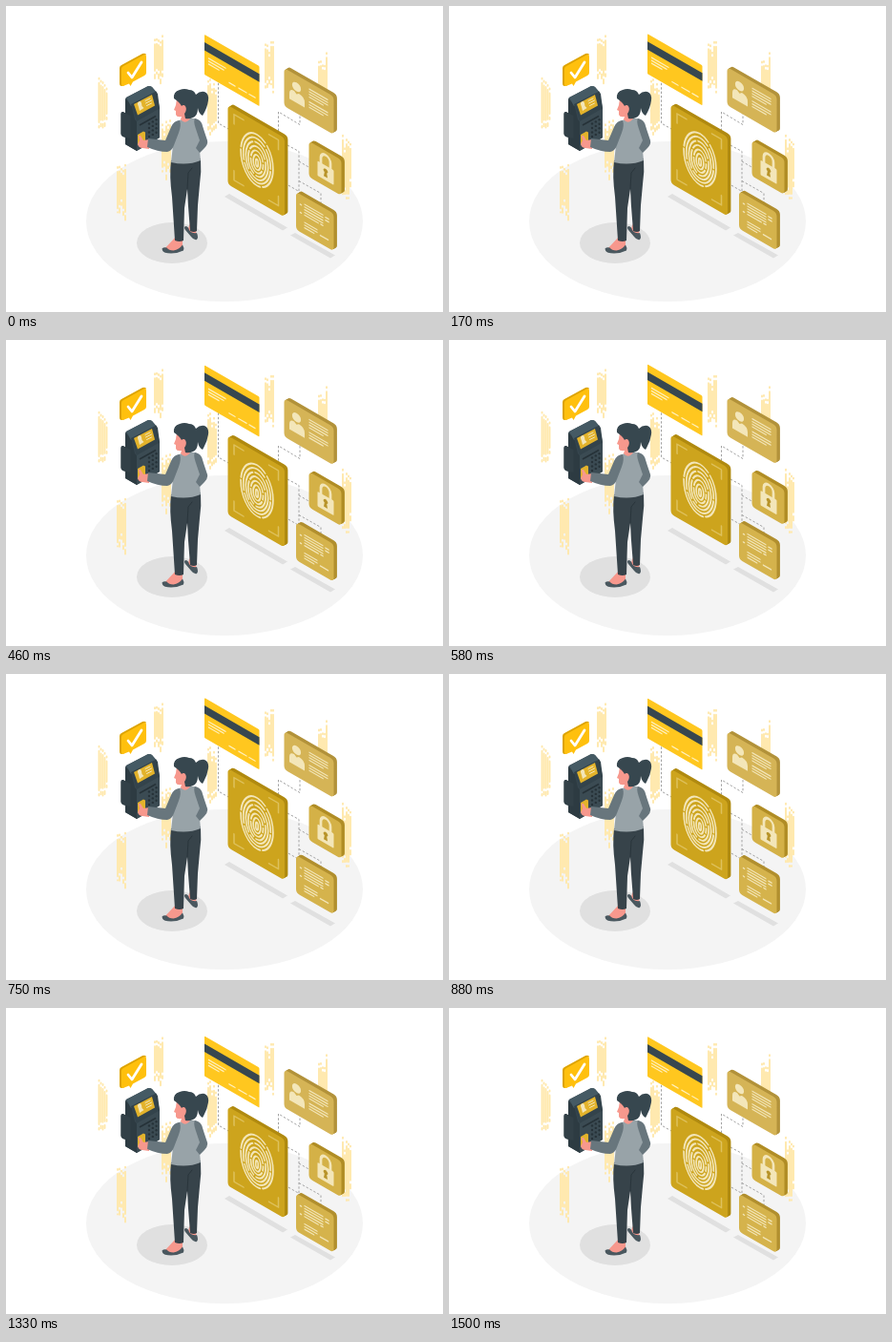
An HTML page that plays this animation: 458 by 321 pixels, repeating every 1540 ms.

```html
<!DOCTYPE html>
<html lang="en">
<head>
<meta charset="utf-8">
<title>Biometric access</title>
<style>
html, body { margin: 0; height: 100%; overflow: hidden; background: #fff; }
svg { display: block; width: 100vw; height: 100vh; }
.line { fill: none; stroke-linecap: round; stroke-linejoin: round; }
.ink { stroke: #f3e6b9; }
.fill { fill: #f3e6b9; }
</style>
</head>
<body>
<svg viewBox="0 0 458 321">
  <ellipse cx="229" cy="226" rx="145" ry="84" fill="#f4f4f4"/>
  <g id="streams" class="line" stroke="#ffe8ac" stroke-width="1.9"/>
  <g fill="#e0e0e0">
    <ellipse cx="174" cy="248.5" rx="37" ry="21.5"/>
    <path d="M229 200l5-3 61 35.5-5 3zM298 240.5l5-2.5 42 23.5-5 3z"/>
  </g>
  <path fill="none" stroke="#a2a2a2" stroke-dasharray="2.4 2"
    d="M222.5 72V123L234 129.5M285.5 131V111L308 124.5V108M295 146l12 6.5V194.5L295 187.5M307 163l12 7M307 183.5l23 13V208"/>

  <g id="bubble">
    <path fill="#dda300" d="M119 65q0-2 2-3l22-12q3-1 4 1l-22 14-1 18-3 1q-2 0-2-3z"/>
    <path fill="#ffc00d" d="M121 66q0-2 2-3l21-11.5q3-1.5 3 1.5V70q0 2-2 3l-12 6.5-2.5 4.5-1.5-2.5-5 2q-3 1.500-3-1.500z"/>
    <path class="line" stroke="#fff" stroke-width="2.8" stroke-linecap="butt" d="M128 70l4 5L142 59"/>
  </g>

  <g id="terminal">
    <path fill="#37474f" d="M120.5 113q0-2 2-2l11 5.5V141l-11-4q-2-1-2-3z"/>
    <path fill="#37474f" d="M125 98q0-1 1-2L149 84q2-.5 4 1l6 7 2 15.500V138l-24 14-12-7z"/>
    <path fill="#2d3b42" d="M125 98l6 4 4 17 2 2.500V152l-12-7z"/>
    <path fill="#324047" d="M120.5 113q0-2 2-2l8 4V139l-8-2q-2-1-2-3z"/>
    <path fill="#455a64" d="M126 96L149 84q2-.5 4 1l5 6-27 14z"/>
    <path fill="#33434b" d="M131 103l26.500-13.500 3.500 18-24 13.500z"/>
    <path fill="#e3b32b" d="M134 103l19-10 3 11.500-18 10z"/>
    <path class="fill" d="M138 103a2 2.300 0 1 1 4-1l.5 3 2 2-4.500 3-1-4z"/>
    <path class="line ink" d="M146 99.5l5-2.500M146.500 102l6-3M147.500 104.500l5-2.500"/>
    <path fill="#3b4b53" d="M137 121l24-13.500V138l-24 14z"/>
    <path stroke="#263238" stroke-width="1.5" d="M140 125l17-9.500"/>
    <g id="keys" fill="#263238"/>
    <path fill="#e3b32b" d="M138 135l6-3.500 2 1V142l-8 4z"/>
  </g>

  <g id="woman">
    <path fill="#f7988d" d="M193 228l7 2-1 10-5 1-4-5zM178 242l7 2v11l-10 3-10-2z"/>
    <path fill="#4a585f" d="M188 231q3 0 4 4 3 4 8 3 2 5 0 7-3 1-6-3l-6-7q-2-3 0-4zM163.500 254.500q2-2 5-1 2 3 7 3 6-1 9.500-6 2 3 1 6-6 3-13 3-8 0-9-3z"/>
    <path fill="#37434a" d="M173 162l31-2q1 14-1 27l-2 22-1 27q-3 2-7 0l-2-26-1-18-3 20-1 34q-4 2-9 0l-3-46q-3-22-1-38z"/>
    <path class="line" stroke="#263238" stroke-width=".8" d="M190 192l1-17 4-5"/>
    <path fill="#f7988d" d="M150 140l-6 1-3-5q-2-1-2 1l1 4-2 4q1 4 5 4l7 1z"/>
    <path fill="#98a3a8" d="M181 120q8-3 17-2 7 1 8 8l2 15-5 11 1 10q-14 6-31 2l2-18 2-19q1-5 4-7z"/>
    <path fill="#68767d" d="M182 120q-6 0-9 7l-6 14-18-2-1 9q11 5 21 5 5-1 7-7l5-13q3-8 1-13z"/>
    <path fill="#68767d" d="M198 118q6 1 8 8l5 15q1 4-3 8l-5 5-4-5 4-8-4-12q-3-8-1-11z"/>
    <path fill="#f7988d" d="M179 97l13 2 1 19q-5 7-10 1l1-3q-5 1-6-2V110l-2-1 2-5z"/>
    <path fill="#37474f" d="M176 97q-1-7 6-9 5-2 10 0 5 0 7 5 4-4 9-3 5 2 4 9-1 8-6 16-4-2-5-8 0 8-5 10-4 2-8 1l-1-5q3-4 1-8-2-2-4 0-2-4-8-8z"/>
    <ellipse cx="186" cy="107.5" rx="2.200" ry="3" fill="#f7988d"/>
  </g>

  <g id="float">
    <g transform="translate(208 30) skewY(30)">
      <rect width="57.5" height="42" rx="1" fill="#ffc71f"/>
      <path fill="#37474f" d="M0 8H57.5v8.500H0z"/>
      <path class="line" stroke="#fff0bd" stroke-width="1.4" d="M4.500 22.500H22M4.500 25.500H20M4.500 28.500H15M26 35.500h6M36 35.500h8M47 35.500h6"/>
    </g>
    <g data-panel="232.5 104 59.5 83" data-face="#cda41d" data-edge="#b08a10">
      <path class="line" stroke="#e5cb72" stroke-opacity=".75" stroke-width="1.500" d="M6.500 16V6H16.500M43 6H53V16M53 65V75H43M16.500 75H6.500V65"/>
      <g id="print" class="line ink" stroke-width="1.7"/>
    </g>
    <g data-panel="291.5 65 52 40" data-face="#d5b456" data-edge="#b2923a">
      <circle class="fill" cx="13" cy="12.500" r="4.600"/>
      <path class="fill" d="M5.500 29V24q0-6 5-6l2.500 2 2.500-2q6 0 6 6v5z"/>
      <path class="line ink" data-rows="26.500 7 19 4"/>
      <path class="line ink" data-rows="26.500 20.500 19 3"/>
    </g>
    <g data-panel="317.500 141.800 34 37.500" data-face="#d4b147" data-edge="#b08d25">
      <path class="line ink" stroke-width="2.700" d="M12.500 16.500V10a5 5.500 0 0 1 10 0V16.500"/>
      <rect class="fill" x="9" y="15.500" width="17" height="15.500" rx="1"/>
      <path fill="#b8942a" d="M16.300 23a2.200 2.200 0 1 1 2.400 0l.8 4.500h-4z"/>
    </g>
    <g data-panel="304 195 39.500 39.500" data-face="#d5b34c" data-edge="#b18f2e">
      <path class="line ink" data-rows="9 8 19 5"/>
      <path class="line ink" data-rows="9 27 13 3"/>
      <path class="line ink" stroke-width="1.500" d="M4.500 10.500h1M4.500 19h1M31 9h3M31 12h3M26 19h2M25.500 31h8"/>
    </g>
  </g>
</svg>
<script>
const PERIOD = 1540, LIFT = 5;
const $ = id => document.getElementById(id);
const repeat = (n, make) => Array.from({ length: n }, (_, i) => make(i)).join("");

let seed = 7;
const random = () => (seed = seed * 16807 % 2147483647) / 2147483647;

// Falling data: long strips with a loose dot at either end
function stream(x, y, h) {
  return repeat(5, i => {
    const top = y + h * (.05 + random() * .25), bottom = y + h * (.6 + random() * .25);
    const sx = x + i * 2;
    return `<path d="M${sx} ${top}V${bottom}M${sx} ${top - 5}v1M${sx} ${bottom + 4}v${random() * 5}"/>`;
  });
}
$("streams").innerHTML = stream(97.5, 78, 53) + stream(117, 158, 70) + stream(156, 33, 51) +
  stream(164, 116, 75) + stream(212, 75, 65) + stream(272, 39, 55) + stream(328, 51, 60) + stream(353, 137, 73);

$("keys").innerHTML = repeat(12, i => {
  const column = i % 3, row = Math.floor(i / 3);
  return `<circle cx="${150 + column * 3.8}" cy="${123.5 + row * 4.5 - column * 2.1}" r="1.2"/>`;
});

// Text blocks: evenly spaced rows, the last one shorter
for (const block of document.querySelectorAll("[data-rows]")) {
  const [x, y, width, count] = block.dataset.rows.split(" ").map(Number);
  block.setAttribute("stroke-width", 1.3);
  block.setAttribute("d", repeat(count, i => `M${x} ${y + i * 2.8}h${i < count - 1 ? width : width * .75}`));
}

// Rounded slabs: a dark back edge with the face in front
for (const panel of document.querySelectorAll("[data-panel]")) {
  const [x, y, w, h] = panel.dataset.panel.split(" ");
  const { face, edge } = panel.dataset;
  const slab = (d, fill) =>
    `<rect x="${d}" y="${-d * 1.15}" width="${w}" height="${h}" rx="3.8" fill="${fill}"/>`;
  panel.setAttribute("transform", `translate(${x} ${y}) skewY(30)`);
  panel.innerHTML = repeat(4, i => slab(3.4 - i * .8, edge)) + slab(0, face) + panel.innerHTML;
}

// Ridges: nested rings, broken at shifting angles
$("print").innerHTML = repeat(7, i => {
  const rx = 1.3 + i * 2.6, ry = 4 + i * 3.8;
  const arc = Math.PI * (rx + ry) * (.29 + i % 3 * .05);
  const dash = i < 2 ? "" : `stroke-dasharray="${arc} 2.8" stroke-dashoffset="${i * 9}"`;
  return `<ellipse cx="30.500" cy="${43 - i * .5}" rx="${rx}" ry="${ry}" ${dash}/>`;
});

function draw(now) {
  const phase = (now % PERIOD + 40) / PERIOD * 2 * Math.PI;
  const y = -LIFT / 2 * (1 - Math.cos(phase));
  $("float").setAttribute("transform", `translate(0 ${y})`);
  requestAnimationFrame(draw);
}
draw(performance.now());
</script>
</body>
</html>
```
